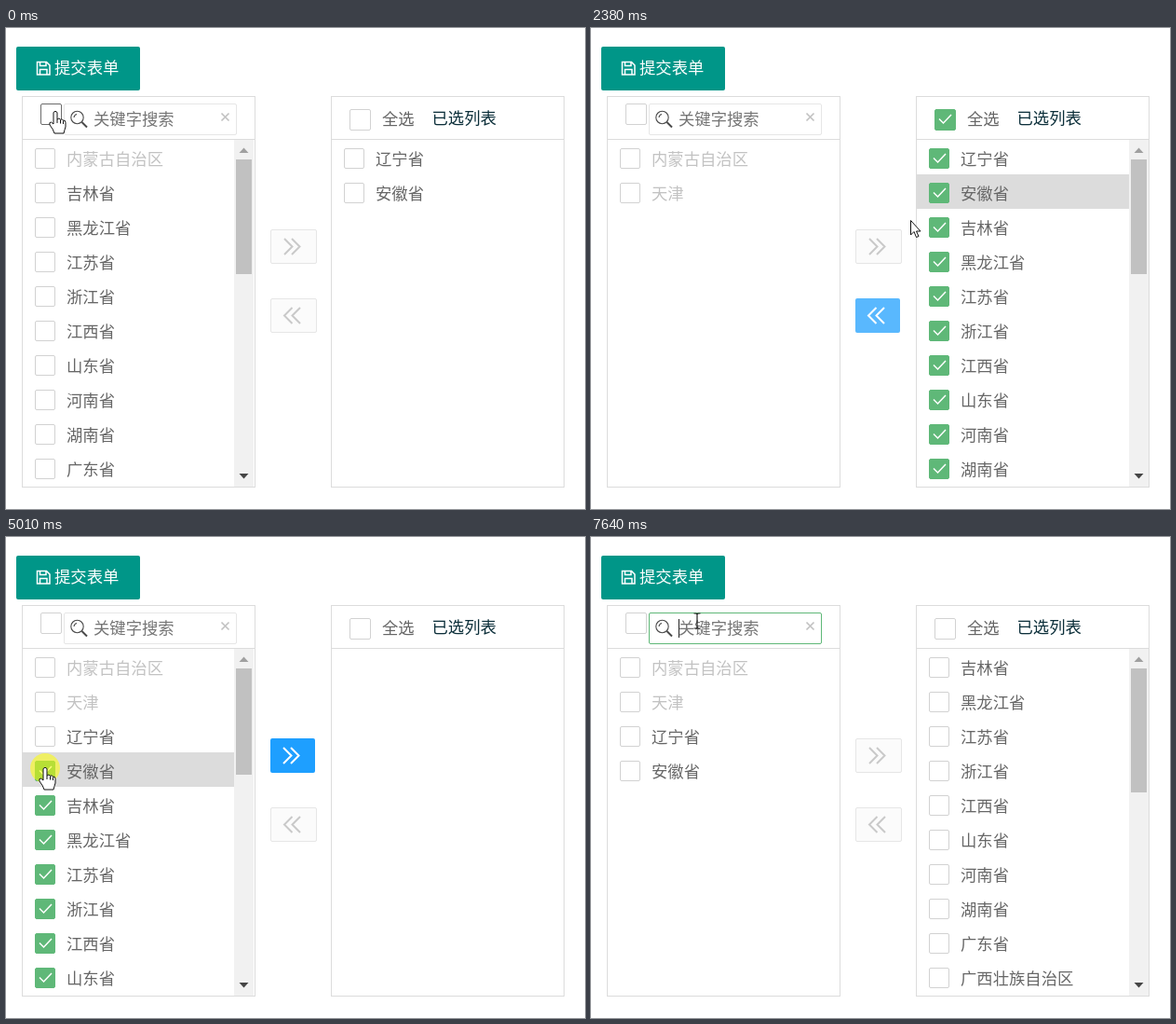
An HTML page for the animation above (8 s loop, 622 by 516 pixels).

```html
<!DOCTYPE html>
<html lang="zh">
<head>
<meta charset="utf-8">
<title>穿梭框</title>
<style>
html, body { margin: 0; width: 100%; height: 100%; overflow: hidden; background: #fff; }
body { position: relative; font: 17.33px "Noto Sans CJK SC", "Noto Sans CJK", sans-serif; color: #666; }
div, svg { position: absolute; box-sizing: border-box; white-space: nowrap; }
svg { overflow: visible; fill: none; }
.panel { border: 1px solid #dcdcdc; }
.line { background: #dcdcdc; }
.row { line-height: 37px; }
.row.hover { background: #dcdcdc; }
.off { color: #c2c2c2; }
.box { border: 1px solid #d2d2d2; border-radius: 2px; background: #fff; }
.box.hover { border-color: #6b6b6b; }
.box svg { left: -1px; top: -1px; stroke: #fff; stroke-width: 1.5; visibility: hidden; }
.box.on { background: #5fb878; border-color: #5fb878; }
.box.on svg { visibility: inherit; }
.bar { background: #f1f1f1; }
.thumb { background: #c1c1c1; }
.btn { border: 1px solid #e6e6e6; border-radius: 2px; }
.btn svg { left: -1px; top: -1px; stroke: #c9c9c9; stroke-width: 2; }
.btn.on { border: 0; }
.btn.on svg { left: -1px; top: 0; stroke: #fff; }
.submit { background: #009688; border-radius: 2px; color: #fff; line-height: 44px; }
.submit svg { left: -1px; top: 0; stroke: #fff; stroke-width: 1.5; }
.input { border: 1px solid #e6e6e6; border-radius: 2px; color: #757575; line-height: 30px; }
.input.focus { border-color: #5fb878; }
.dark { color: #0c2f3a; }
.ring { border-radius: 50%; background: rgba(255, 255, 0, .55); }
.caret { background: #222; }
</style>
</head>
<body>
<script>
const LOOP = 8000, TICK = 77, ROW = 37, TOP = 120;

const add = (parent, cls, x, y, w, h, html = '') => {
  const d = document.createElement('div');
  d.className = cls;
  Object.assign(d.style, { left: x + 'px', top: y + 'px', width: w + 'px', height: h + 'px' });
  d.innerHTML = html;
  parent.append(d);
  return d;
};
const svg = (body, attrs = '') => `<svg width="1" height="1" ${attrs}>${body}</svg>`;
const path = (d, attrs = '') => `<path d="${d}" ${attrs}/>`;
const show = (node, on) => { node.style.visibility = on ? 'visible' : 'hidden'; };
const within = (t, spans) => spans.some(([a, b]) => t >= a && t < b);

// Eased 0..1 level that follows a set of on-spans
const ease = x => 1 - (1 - Math.min(1, Math.max(0, x))) ** 2.4;
const level = (t, spans) => Math.max(0, ...spans.map(([a, b]) =>
  t < b ? ease((t - a) / 300) : 1 - ease((t - b) / 200)));

// ---- data ----
const locked = ['内蒙古自治区', '天津'];
const pair = ['辽宁省', '安徽省'];
const rest = ['吉林省', '黑龙江省', '江苏省', '浙江省', '江西省', '山东省', '河南省',
  '湖南省', '广东省', '广西壮族自治区'];
const REST = 25;
const stages = [
  { from: 0, left: [locked[0], ...rest], right: pair, nl: REST + 2, nr: 2 },
  { from: 1232, left: locked, right: [...pair, ...rest], nl: 2, nr: REST + 2 },
  { from: 3234, left: [...locked, ...pair, ...rest], right: [], nl: REST + 4, nr: 0 },
  { from: 5929, left: [...locked, ...pair], right: rest, nl: 4, nr: REST }
];

// ---- timeline ----
const leftAll = [[231, 1232], [3927, 4774]];
const leftRest = [[231, 1232], [3927, 5929]];
const rightAll = [[2260, 3234]];
const clicks = [[77, 231], [1078, 1232], [2230, 2300], [3080, 3234], [3773, 3927],
  [4620, 4774], [4928, 5082], [5775, 5929], [7315, 7392]];
const uncheckAt = { 辽宁省: 4774, 安徽省: 5082 };
const focusAt = 7392;
const track = [
  [0, 53, 89], [231, 53, 89], [308, 85, 106], [539, 222, 184], [770, 318, 212], [847, 318, 212],
  [924, 322, 234], [1232, 322, 233], [1463, 322, 233], [1617, 344, 197], [1694, 360, 168],
  [1848, 373, 130], [2040, 380, 97], [2300, 380, 97], [2387, 343, 206], [2695, 316, 285],
  [2980, 312, 298], [3234, 312, 298], [3311, 214, 230], [3388, 92, 136], [3430, 58, 116],
  [3465, 55, 113], [3619, 47, 97], [4004, 47, 97], [4158, 45, 135], [4466, 42, 212], [4774, 42, 212],
  [4928, 42, 247], [5082, 42, 247], [5159, 60, 258], [5390, 212, 262], [5544, 270, 248],
  [5698, 322, 235], [5929, 322, 235], [6237, 212, 135], [6314, 180, 100], [6391, 148, 64],
  [6468, 125, 47], [7084, 125, 47], [7315, 114, 90], [LOOP, 114, 90]
];
const cursorAt = t => {
  const i = Math.max(1, track.findIndex(p => p[0] > t));
  const [a, ax, ay] = track[i - 1], [b, bx, by] = track[i];
  const k = Math.max(0, (t - a) / (b - a));
  return [ax + (bx - ax) * k, ay + (by - ay) * k];
};

// ---- stage ----
const CHECK = svg(path('M5 10.5l4.5 4.5L18 6'));
const addBox = (x, y, size = 22) => {
  const node = add(document.body, 'box', x, y, size, size, CHECK);
  return { node, x, y };
};
const setBox = (box, on, hover) => {
  box.node.className = 'box' + (on ? ' on' : hover ? ' hover' : '');
};
const hit = ([px, py], x, y, w, h) => px >= x && px < x + w && py >= y && py < y + h;
const overBox = (p, b) => hit(p, b.x, b.y, 23, 23);

const submit = add(document.body, 'submit', 11, 20, 133, 47, svg(path(
  'M23.500 16.500h10l3.500 3.500v10H23.500zM26.500 16.500v4h6.500v-4M26.500 30v-5.500h7.500v5.500')));
add(submit, '', 41, 0, 80, 47, '提交表单');

const makePanel = (x, barX, headX, headY) => {
  add(document.body, 'panel', x, 73, 251, 420);
  add(document.body, 'line', x + 1, 119, 249, 1);
  const rows = [...Array(10).keys()].map(i => {
    const y = TOP + i * ROW;
    const node = add(document.body, 'row', x + 1, y, 249, ROW);
    const text = add(node, '', 47, 1, 180, ROW);
    return { node, text, y, box: addBox(x + 14, y + 9) };
  });
  const bar = add(document.body, 'bar', barX, TOP, 21, 372, svg(
    path('M5.500 14l5-5.500 5 5.500z', 'fill="#a0a0a0"') +
    path('M5.500 358l5 5.500 5-5.500z', 'fill="#454545"')));
  const thumb = add(bar, 'thumb', 2, 21, 17, 10);
  return { x, barX, rows, bar, thumb, head: addBox(headX, headY, 23) };
};
const left = makePanel(17, 245, 37, 81);
const right = makePanel(349, 578, 369, 87);

add(document.body, '', 404, 78, 50, 37, '全选').style.lineHeight = '37px';
add(document.body, 'dark', 457.5, 77, 90, 37, '已选列表').style.lineHeight = '37px';

const input = add(document.body, 'input', 62, 81, 186, 34, svg(
  '<circle cx="13.500" cy="14" r="6.700"/>' + path('M10 14a4 4 0 0 1 3-3.500') +
  path('M18.500 19l5.500 5.500', 'stroke-width="2"'), 'stroke="#4a4a4a" stroke-width="1.100"') +
  svg(path('M168.500 9.500l8 8m0-8l-8 8', 'stroke="#c2c2c2" stroke-width="1.700"')));
add(input, '', 31, 0, 100, 32, '关键字搜索');
const caret = add(document.body, 'caret', 94, 88, 1, 20);

const makeButton = (y, d, spans, hovers) => ({
  y, spans, hovers, node: add(document.body, 'btn', 284, y, 50, 37, svg(path(d)))
});
const buttons = [
  makeButton(216, 'M15 10l8.500 8.500L15 27M23 10l8.500 8.500L23 27', leftRest, [[885, 1232], [5670, 5929]]),
  makeButton(290, 'M23.500 10L15 18.500l8.500 8.500M32 10l-8.500 8.500L32 27', rightAll, [[2700, 3234]])
];

const ring = add(document.body, 'ring', 0, 0, 32, 32);
const ink = 'fill="#fff" stroke="#111" stroke-linejoin="round"';
const noSign = '<circle r="8"/><path d="M-5.500-5.500L5.500 5.500"/>';
const shapes = {
  arrow: path('M.5 .5V16L4 12.500L6.500 18.500L9 17.500L6.500 12H11Z', ink),
  hand: path('M-2 1.500Q0-1 2 1.500V9Q4 7 5.500 9.200Q7.500 8 8.500 10.200Q11 9.500 11 12.500V17Q10 20 9 24H-1Q-2 20-6 15Q-7 12-4.500 12L-2 14Z', ink) +
    path('M2 9v4M5.500 9.500v4M8.500 10.500v3.500', 'stroke="#111"'),
  no: `<g stroke="#fff" stroke-width="4">${noSign}</g><g stroke="#222" stroke-width="2">${noSign}</g>`,
  beam: path('M-3.500-8H-1L0-7L1-8H3.500M0-7V7M-3.500 8H-1L0 7L1 8H3.500', 'stroke="#222" stroke-width="1.200"')
};
const cursor = add(document.body, '', 0, 0, 1, 1);
const cursors = Object.fromEntries(Object.entries(shapes).map(([k, s]) =>
  [k, add(cursor, '', 0, 0, 1, 1, svg(s))]));

// ---- drawing ----
const drawPanel = (panel, names, count, t, p, isOn) => {
  const scrolls = count > 10;
  const trail = cursorAt(Math.max(0, t - 30));
  const width = scrolls ? panel.barX - panel.x - 1 : 249;
  let kind;
  show(panel.bar, scrolls);
  panel.thumb.style.height = Math.round(330 * 372 / (ROW * Math.max(1, count))) + 'px';
  panel.rows.forEach(({ node, text, y, box }, i) => {
    const name = names[i], off = locked.includes(name), over = overBox(p, box);
    show(node, name);
    show(box.node, name);
    if (!name) return;
    node.className = 'row' + (off ? ' off' : '') + (hit(trail, panel.x + 1, y, width, ROW) ? ' hover' : '');
    node.style.width = width + 'px';
    text.textContent = name;
    setBox(box, !off && isOn(name), over && !off);
    if (over) kind = off ? 'no' : 'hand';
  });
  return kind;
};

const drawButton = ({ node, y, spans, hovers }, t, p) => {
  const on = within(t, spans), k = level(t, spans);
  const mix = [30, 159, 255].map(c => Math.round(251 + (c - 251) * k));
  node.className = 'btn' + (on ? ' on' : '');
  node.style.width = (on ? 48 : 50) + 'px';
  node.style.background = `rgb(${mix})`;
  node.style.opacity = 1 - .2 * level(t, hovers);
  if (hit(p, 284, y, 50, 37)) return on ? 'hand' : 'no';
};

const draw = t => {
  const p = cursorAt(t);
  const s = stages.findLast(v => t >= v.from);
  const onLeft = name => within(t, leftRest) && !(t >= uncheckAt[name]);
  const onRight = () => within(t, rightAll);
  const kinds = [
    drawPanel(left, s.left, s.nl, t, p, onLeft),
    drawPanel(right, s.right, s.nr, t, p, onRight),
    ...buttons.map(b => drawButton(b, t, p))
  ];
  [[left, leftAll], [right, rightAll]].forEach(([{ head }, spans]) => {
    const over = overBox(p, head);
    setBox(head, within(t, spans), over);
    if (over) kinds.push('hand');
  });
  if (hit(p, 11, 20, 133, 47)) kinds.push('hand');
  if (hit(p, 62, 81, 186, 34)) kinds.push('beam');

  submit.style.opacity = 1 - .2 * level(t, [[6440, 7161]]);
  input.className = 'input' + (t >= focusAt ? ' focus' : '');
  show(caret, t >= focusAt);
  show(ring, within(t, clicks));
  ring.style.transform = `translate(${p[0] - 16}px, ${p[1] - 15}px)`;
  cursor.style.transform = `translate(${Math.round(p[0])}px, ${Math.round(p[1])}px)`;
  const kind = kinds.find(Boolean) || 'arrow';
  for (const k in cursors) show(cursors[k], k === kind);
};

// The picture advances about 13 times per second
const start = performance.now();
const frame = () => {
  const t = (performance.now() - start) % LOOP;
  draw(Math.floor((t + 12) / TICK) * TICK);
  requestAnimationFrame(frame);
};
frame();
</script>
</body>
</html>
```
